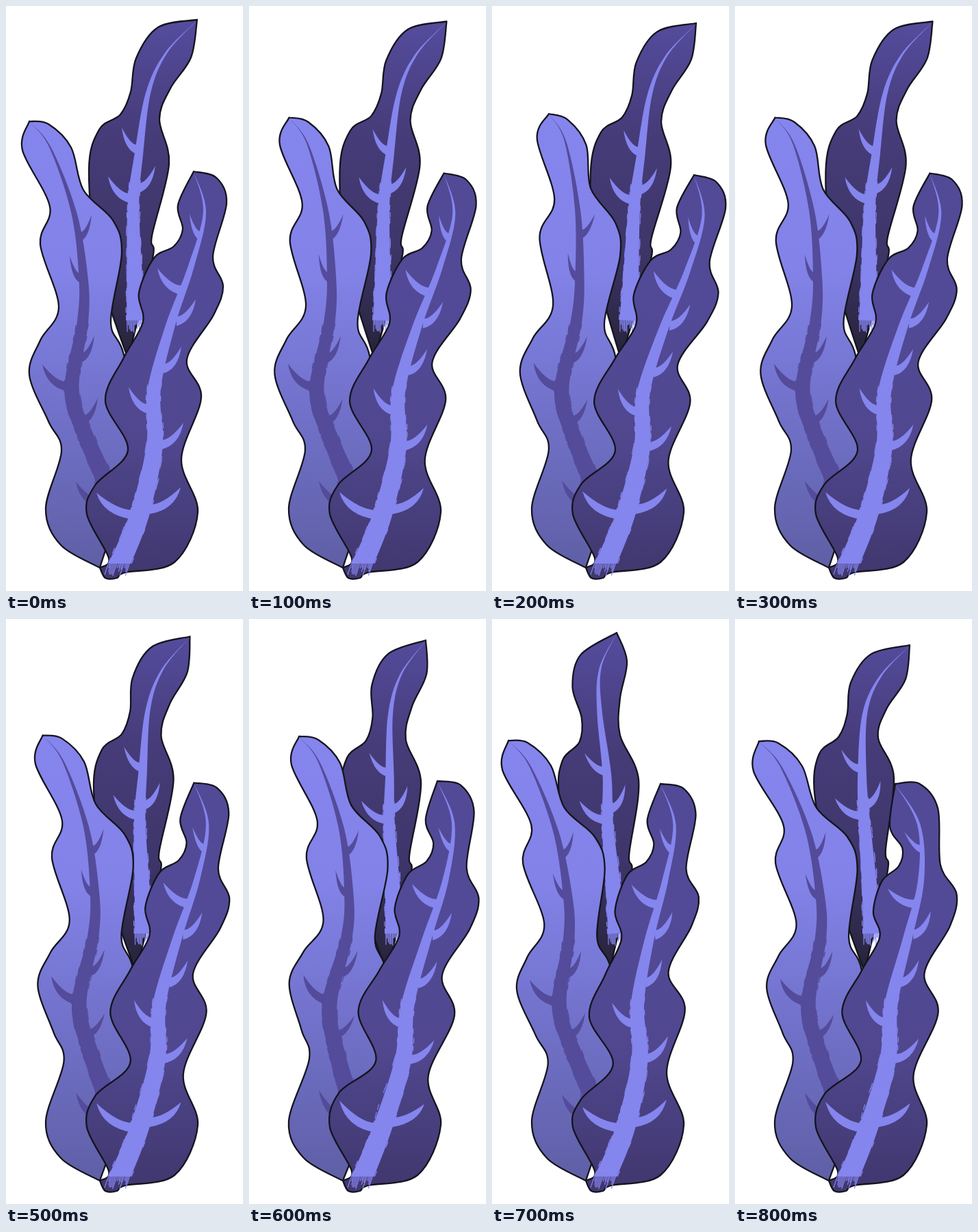
Recreate the animation shown at these times as an HTML page with a canvas. Size 346 by 852 pixels, loop 900 ms.

```html
<!DOCTYPE html>
<html lang="en">
<head>
<meta charset="utf-8">
<title>Swaying seaweed</title>
<style>
  html, body { margin: 0; width: 100%; height: 100%; overflow: hidden; background: #fff; }
  canvas { display: block; width: 346px; height: 852px; }
</style>
</head>
<body>
<canvas id="stage" width="346" height="852"></canvas>
<script>
const ctx = document.getElementById('stage').getContext('2d');
const INK = '#14141d', LIGHT = '#8585ee', VIOLET = '#544b9a';

// Outlines and veins run from tip to base; outlines name only bulges and pinches.
// A sway shifts four evenly spaced joints by x, and lifts the tip and middle by y.
const back = {
  colors: ['#554c9e', '#463c79', '#3e366a', '#262238'],
  vein: LIGHT, veinWidth: 26, root: 455,
  left: [[279,20], [222,31], [190,76], [182,125], [167,158], [136,180], [121,240], [135,380], [178,514]],
  right: [[279,20], [270,75], [240,120], [224,165], [238,230], [213,335], [214,368], [178,514]],
  spine: [[279,21], [234,68], [208,125], [194,215], [186,290], [188,400], [189,458]],
  barbs: [[169,177], [218,233], [149,248]],
  sway: {
    right: { x: [19, 23, 21, 10], y: [5, 3] },
    lean: { x: [-21, 5, 20, 23], y: [11, 13] },
    left: { x: [-97, -37, -15, -7], y: [0, 12] },
    back: { x: [-24, -15, 5, 11], y: [18, 7] }
  }
};

const pale = {
  colors: [LIGHT, '#8282e8', '#7070c8', '#5f5fa6'],
  vein: VIOLET, veinWidth: 29, root: 690,
  left: [[34,168], [24,210], [64,292], [50,347], [77,438], [50,487], [34,537], [62,605], [81,648],
    [58,732], [80,785], [137,818]],
  right: [[34,168], [62,172], [95,206], [113,268], [156,312], [169,360], [153,460], [172,508],
    [192,630], [137,818]],
  spine: [[34,169], [64,205], [99,300], [113,395], [112,460], [96,560], [118,630], [142,685], [148,715]],
  barbs: [[125,304], [93,364], [129,480], [53,522], [134,571], [102,693]],
  sway: {
    right: { x: [49, 20, 8, 0], y: [-11, -1] },
    lean: { x: [39, 34, 27, 0], y: [3, 2] },
    left: { x: [-10, -5, 2, 0], y: [9, 5] },
    back: { x: [1, 9, 13, 0], y: [10, 5] }
  }
};

const front = {
  colors: ['#524a97', '#524a97', '#50478f', '#413870'],
  vein: LIGHT, veinWidth: 33, root: 710,
  left: [[274,241], [251,290], [258,325], [245,350], [216,367], [194,418], [200,460], [172,512],
    [145,575], [178,647], [130,698], [118,740], [150,804], [137,818]],
  right: [[274,241], [307,250], [322,287], [302,365], [317,408], [303,450], [264,515], [285,570],
    [256,660], [280,737], [246,810], [174,825], [162,833], [145,833], [137,818]],
  spine: [[274,242], [290,300], [270,380], [240,465], [216,560], [217,640], [195,740], [166,812]],
  barbs: [[268,303], [221,382], [277,427], [256,496], [179,555], [259,607], [255,701], [132,709]],
  sway: {
    right: { x: [21, 14, 5, 0], y: [5, 6] },
    lean: { x: [1, 18, 16, 0], y: [-5, 2] },
    left: { x: [-28, -16, -4, 0], y: [-1, 2] },
    back: { x: [-40, 5, 12, 0], y: [-1, 1] }
  }
};

// One step per 100 ms: pose and how far it is bent from rest.
const steps = [['right', 0], ['right', .5], ['right', 1], ['right', .5], ['right', 0],
  ['lean', .5], ['lean', 1], ['left', 1], ['back', 1]];

const clamp = (v, lo, hi) => Math.min(hi, Math.max(lo, v));
const noise = n => { const v = Math.sin(n * 12.9898) * 43758.5453; return v - Math.floor(v); };

// Smooth curve through (keys, values), flat beyond the ends.
function sample(keys, values, at) {
  const last = keys.length - 1;
  if (at <= keys[0]) return values[0];
  if (at >= keys[last]) return values[last];
  const i = keys.findIndex(k => k > at) - 1;
  const slope = n => {
    const a = Math.max(0, n - 1), b = Math.min(last, n + 1);
    return (values[b] - values[a]) / (keys[b] - keys[a]);
  };
  const h = keys[i + 1] - keys[i], t = (at - keys[i]) / h, t2 = t * t, t3 = t2 * t;
  return (2 * t3 - 3 * t2 + 1) * values[i] + (3 * t2 - 2 * t3) * values[i + 1]
    + h * ((t3 - 2 * t2 + t) * slope(i) + (t3 - t2) * slope(i + 1));
}

const spineAt = ({ spine }, y) => sample(spine.map(p => p[1]), spine.map(p => p[0]), y);

function veinHalf({ spine, veinWidth }, y) {
  const top = spine[0][1], bottom = spine[spine.length - 1][1];
  return veinWidth / 2 * clamp((y - top) / (bottom - top), 0, 1) ** .9;
}

// Shifts points with the spine; the sideways slope also tilts them around it.
function makeWarp(leaf, pose, amount) {
  const top = leaf.spine[0][1], span = leaf.root - top;
  const { x: shifts, y: [tipLift, midLift] } = leaf.sway[pose];
  const joints = shifts.map((_, i) => top + span * i / 3);
  const shift = y => amount * sample(joints, shifts, y);
  return ([x, y]) => {
    const h = clamp((leaf.root - y) / span, 0, 1);
    const lift = amount * (midLift * 4 * h * (1 - h) + tipLift * h * (2 * h - 1));
    const a = clamp(y - 12, top, leaf.root), b = clamp(y + 12, top, leaf.root);
    const tilt = (shift(a) - shift(b)) / Math.max(1, b - a);
    return [x + shift(y), y + lift + tilt * (x - spineAt(leaf, y))];
  };
}

function curve(points) {
  for (let i = 0; i < points.length - 1; i++) {
    const p = points[Math.max(0, i - 1)], a = points[i], b = points[i + 1];
    const n = points[Math.min(points.length - 1, i + 2)];
    ctx.bezierCurveTo(a[0] + (b[0] - p[0]) / 6, a[1] + (b[1] - p[1]) / 6,
      b[0] - (n[0] - a[0]) / 6, b[1] - (n[1] - a[1]) / 6, ...b);
  }
}

function blade(left, right, warp) {
  const down = left.map(warp), up = right.map(warp).reverse();
  ctx.beginPath();
  ctx.moveTo(...down[0]);
  curve(down);
  ctx.lineTo(...up[0]);
  curve(up);
  ctx.closePath();
}

function drawBarb(leaf, [x, y], warp) {
  const baseY = y + 25, footY = baseY + 14, baseX = spineAt(leaf, baseY);
  const side = Math.sign(x - baseX);
  const edge = baseX + side * veinHalf(leaf, baseY) * .7, bend = x + (edge - x) * .18;
  const [tip, inner, base, foot, outer] = [[x, y], [(bend + edge) / 2, baseY + 1],
    [edge, baseY], [edge, footY], [bend, footY - 6]].map(warp);
  ctx.beginPath();
  ctx.moveTo(...tip);
  ctx.quadraticCurveTo(...inner, ...base);
  ctx.lineTo(...foot);
  ctx.quadraticCurveTo(...outer, ...tip);
  ctx.fill();
}

// Dry-brush strokes: short ones along the lower edges, longer ones at the end.
function drawBristles(leaf, warp) {
  const [[px, py], [ex, ey]] = leaf.spine.slice(-2);
  const half = veinHalf(leaf, ey), lean = (ex - px) / (ey - py);
  const line = (...points) => points.map(warp).forEach((p, i) => i ? ctx.lineTo(...p) : ctx.moveTo(...p));
  ctx.beginPath();
  for (let i = 0; i < 40; i++) {
    const y = ey - (ey - leaf.spine[0][1]) * .45 * noise(i), side = i % 2 ? 1 : -1;
    const at = v => [spineAt(leaf, v) + side * (veinHalf(leaf, y) + noise(i + 50)), v];
    line(at(y), at(y - 8));
  }
  for (let i = 0; i < 16; i++) {
    const x = ex + half * (i / 8 - .94), reach = 5 + 14 * noise(i + 90);
    line([x, ey - 3], [x + lean * reach, ey + reach]);
  }
  ctx.strokeStyle = leaf.vein;
  ctx.lineWidth = 1.2;
  ctx.stroke();
}

function drawLeaf(leaf, pose, amount) {
  const warp = makeWarp(leaf, pose, amount);
  const shade = ctx.createLinearGradient(0, leaf.left[0][1], 0, leaf.left[leaf.left.length - 1][1]);
  leaf.colors.forEach((color, i) => shade.addColorStop(i / 3, color));

  blade(leaf.left, leaf.right, warp);
  ctx.fillStyle = shade;
  ctx.fill();
  ctx.strokeStyle = INK;
  ctx.lineWidth = 2.3;
  ctx.stroke();

  const veinSide = side => leaf.spine.map(([x, y]) => [x + side * veinHalf(leaf, y), y]);
  blade(veinSide(-1), veinSide(1), warp);
  ctx.fillStyle = leaf.vein;
  ctx.fill();
  leaf.barbs.forEach(tip => drawBarb(leaf, tip, warp));
  drawBristles(leaf, warp);
}

const start = performance.now();
function render() {
  const [pose, amount] = steps[Math.floor((performance.now() - start) % 900 / 100)];
  ctx.clearRect(0, 0, 346, 852);
  [back, pale, front].forEach(leaf => drawLeaf(leaf, pose, amount));
  requestAnimationFrame(render);
}
ctx.lineJoin = 'round';
render();
</script>
</body>
</html>
```
